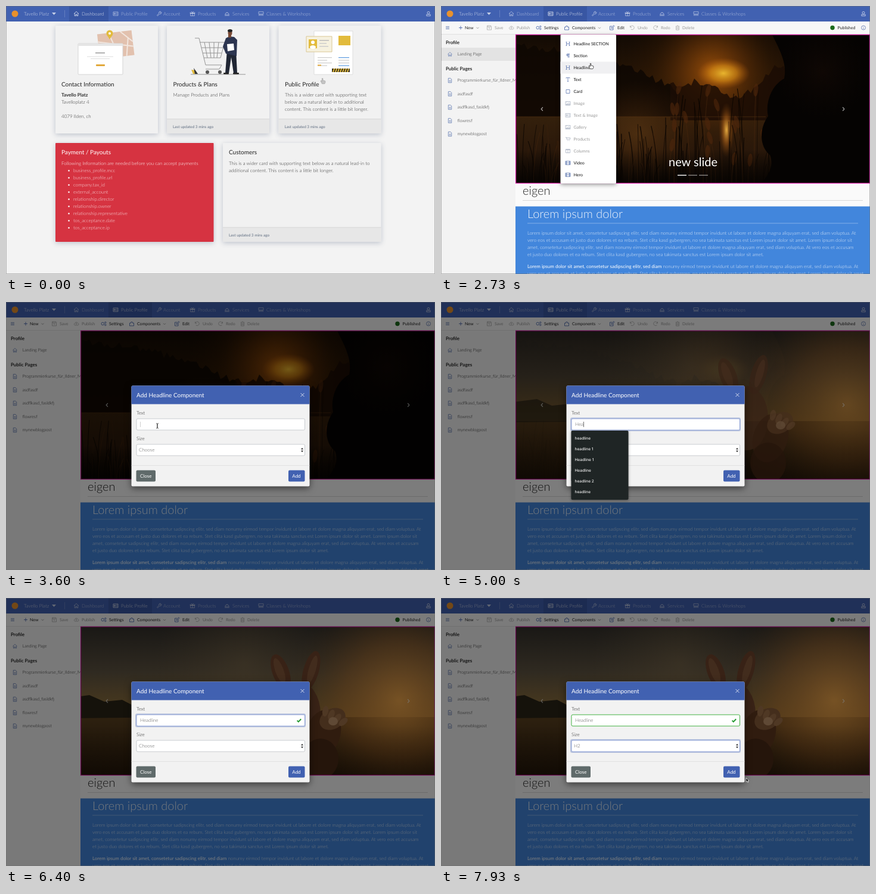
An HTML page with a canvas for the animation above (8 s loop, 720 by 450 pixels).

```html
<!DOCTYPE html>
<html lang="en">
<head>
<meta charset="utf-8">
<title>Page builder</title>
<style>
html, body { margin: 0; width: 100%; height: 100%; overflow: hidden; background: #f3f3f3; }
canvas { display: block; width: 100vw; height: 100vh; }
</style>
</head>
<body>
<canvas id="stage"></canvas>
<script>
const W = 720, H = 450, LOOP = 8000;
const canvas = document.getElementById('stage');
const c = canvas.getContext('2d');
const ratio = window.devicePixelRatio || 1;
canvas.width = W * ratio;
canvas.height = H * ratio;
c.textRendering = 'geometricPrecision';

const BLUE = '#4161b1', INK = '#222', GREY = '#999', SLATE = '#5f78b0';
const OWNER = 'Tavello Platz';

const icons = {
  home: 'M-4 0L0-3.7 4 0M-2.8-.8V3.5H-.8V1H.8V3.5H2.8V-.8',
  id: 'M-4-3H4V3H-4ZM-2.5-1H-.5V1H-2.5ZM1-1H3M1 1H3',
  wrench: 'M-3.6 2.6L-2.6 3.6 .8.4A2.4 2.4 0 0 0 3.8-2.6L2.2-1.2 1.2-2.2 2.6-3.7A2.4 2.4 0 0 0-.4-.6Z',
  gift: 'M-3.4-.5H3.4V3.5H-3.4ZM-4-2H4V-.5H-4ZM0-2V3.5M0-2L-2-3.8M0-2L2-3.8',
  bell: 'M-4 3H4M-3.3 1.8A3.3 3.6 0 0 1 3.3 1.8ZM0-1.9V-3',
  shop: 'M-4-3.3H4V.5H-4ZM-3 2V3.5M0 2V3.5M3 2V3.5M-4 2H4',
  user: 'M-2-1.6A2 2 0 1 1 2-1.6A2 2 0 1 1-2-1.6ZM-3.2 3.7V1.2H3.2V3.7Z',
  menu: 'M-3-2H3M-3 0H3M-3 2H3',
  plus: 'M-3 0H3M0-3V3',
  save: 'M-3.5-3.5H2.5L3.5-2.5V3.5H-3.5ZM-2-3.5V-1H1.5V-3.5M-1.2 1.2H1.2',
  cloud: 'M-2.5 2.5A2 2 0 0 1-2.5-1A3 3 0 0 1 2.8-.8A1.7 1.7 0 0 1 2.5 2.5ZM0 1.5V-1M-1 0L0-1 1 0',
  gear: 'M-4 0A2.3 2.3 0 1 1 .6 0A2.3 2.3 0 1 1-4 0ZM1.6-2A1.2 1.2 0 1 1 4-2A1.2 1.2 0 1 1 1.6-2ZM1.6 2A1.2 1.2 0 1 1 4 2A1.2 1.2 0 1 1 1.6 2Z',
  puzzle: 'M-3.5-1.2H-1.3A1.4 1.4 0 1 1 1.3-1.2H3.5V3.5H-3.5Z',
  edit: 'M2 0V3.5H-3.5V-2.5H0M-1 1L-.8-.6 3-4 4-3 .5.8Z',
  undo: 'M-3.5-3.5V-.8H-.8M-3.3-1A3.3 3.3 0 1 1-2.3 2.3',
  redo: 'M3.5-3.5V-.8H.8M3.3-1A3.3 3.3 0 1 0 2.3 2.3',
  trash: 'M-3-2.5H3M-2.4-2.5V3.6H2.4V-2.5M-1-3.5H1M-.9-.8V2M.9-.8V2',
  file: 'M-2.7-3.7H1L2.7-2V3.7H-2.7ZM-1.3 0H1.3M-1.3 1.7H1.3',
  info: 'M-3.5 0A3.5 3.5 0 1 1 3.5 0A3.5 3.5 0 1 1-3.5 0ZM0-.5V2M0-2V-1.5',
  h: 'M-2.5-3V3M2.5-3V3M-2.5 0H2.5M-3.5-3H-1.5M1.5-3H3.5M-3.5 3H-1.5M1.5 3H3.5',
  para: 'M3-3H-.8A1.6 1.6 0 0 0-.8.2H.3M.3-3V3.2M2-3V3.2M-1-2.2H0M-1.2-1.4H0M-1-.6H0',
  text: 'M-3-2V-3.2H3V-2M0-3.2V3.2M-1.2 3.2H1.2',
  square: 'M-3-3H3V3H-3Z',
  image: 'M-4-3H4V3H-4ZM-3 2L-1 0 0 1 1.5-1 3 1V2ZM-2.5-1.5H-1.5',
  cart: 'M-4-3H-2.6L-1.5 1.2H3L4-2H-2.3M-1 3H-.6M2.4 3H2.8',
  columns: 'M-3.5-3H3.5V3H-3.5ZM0-3V3M-3.5-2.2H3.5',
  film: 'M-4-3H4V3H-4ZM-2.4-3V3M2.4-3V3M-2.4 0H2.4M-4-1H-2.4M-4 1H-2.4M2.4-1H4M2.4 1H4',
  caret: 'M-2-1L0 1 2-1',
  left: 'M1.4-3L-1.4 0 1.4 3',
  right: 'M-1.4-3L1.4 0-1.4 3',
  close: 'M-3-3L3 3M3-3L-3 3',
  check: 'M-3.2 0L-1 2.3 3.4-2.3'
};
for (const k in icons) icons[k] = new Path2D(icons[k]);
const hand = new Path2D('M-1.6 4.6L-4-.2-2.8-.9-1.6.6V-4.5H-.2V-1H1.2L3.8 0V2.6L2.8 4.6Z');
const arrow = new Path2D('M0 0V8.2L1.9 6.4 3.2 9.2 4.5 8.6 3.3 5.9H5.8Z');

const clamp = v => Math.max(0, Math.min(1, v));
const ease = v => { v = clamp(v); return v * v * (3 - 2 * v); };
const prog = (t, a, b) => ease((t - a) / (b - a));

function seeded(s) {
  return () => (s = (s * 16807) % 2147483647) / 2147483647;
}

function box(x, y, w, h, fill, r = 0, line) {
  c.beginPath();
  c.roundRect(x, y, w, h, r);
  if (fill) { c.fillStyle = fill; c.fill(); }
  if (line) { c.strokeStyle = line; c.lineWidth = 1; c.stroke(); }
}

function dot(x, y, r, fill) { oval(x, y, r, r, fill); }

function oval(x, y, rx, ry, fill, rot = 0) {
  c.beginPath();
  c.ellipse(x, y, rx, ry, rot, 0, 7);
  c.fillStyle = fill;
  c.fill();
}

function poly(fill, ...p) {
  c.beginPath();
  for (let i = 0; i < p.length; i += 2) c.lineTo(p[i], p[i + 1]);
  c.closePath();
  c.fillStyle = fill;
  c.fill();
}

// y is the optical middle of the line
function text(s, x, y, size = 8, color = INK, weight = 400, family = 'Lato') {
  c.font = `${weight} ${size}px ${family}, sans-serif`;
  c.fillStyle = color;
  c.fillText(s, x, y + size * .34);
  return c.measureText(s).width;
}

function wrap(s, x, y, width, step, color) {
  c.font = '300 8px Lato, sans-serif';
  let line = '';
  for (const word of s.split(' ')) {
    const next = line ? line + ' ' + word : word;
    if (c.measureText(next).width > width) {
      text(line, x, y, 8, color, 300);
      y += step;
      line = word;
    } else line = next;
  }
  text(line, x, y, 8, color, 300);
}

function icon(name, x, y, color, size = 1, width = .8) {
  c.save();
  c.translate(x, y);
  c.scale(size, size);
  c.strokeStyle = color;
  c.lineWidth = width;
  c.stroke(icons[name]);
  c.restore();
}

function shadow(blur, color, dy = 0) {
  c.shadowBlur = blur * ratio;
  c.shadowColor = color;
  c.shadowOffsetY = dy * ratio;
}

function group(draw) { c.save(); draw(); c.restore(); }

function glow(x, y, r, ...colors) {
  const g = c.createRadialGradient(x, y, 0, x, y, r);
  colors.forEach((k, i) => g.addColorStop(i / (colors.length - 1), k));
  c.fillStyle = g;
  c.fillRect(x - r, y - r, 2 * r, 2 * r);
}

function fade(y0, y1, ...colors) {
  const g = c.createLinearGradient(0, y0, 0, y1);
  colors.forEach((k, i) => g.addColorStop(i / (colors.length - 1), k));
  c.fillStyle = g;
  c.fillRect(100, y0, 660, y1 - y0);
}

const tabs = [
  ['home', 118, 'Dashboard', 127], ['id', 184, 'Public Profile', 193], ['wrench', 257, 'Account', 264],
  ['gift', 313, 'Products', 322], ['bell', 371, 'Services', 380], ['shop', 428, 'Classes & Workshops', 437]
];

function nav(active) {
  box(0, 0, W, 26, BLUE);
  if (active) box(172, 0, 73, 26, '#3856a3');
  else box(106, 0, 66, 26, '#3856a3');
  dot(15, 13, 5.5, '#e8912d');
  text(OWNER, 30, 13, 8, 'rgba(255,255,255,.75)', 300);
  poly('rgba(255,255,255,.7)', 77, 11, 84, 11, 80.5, 15);
  box(98, 7, .6, 12, 'rgba(255,255,255,.3)');
  tabs.forEach(([name, ix, label, x], i) => {
    const color = `rgba(255,255,255,${i === active ? .85 : .58})`;
    icon(name, ix, 13, color);
    text(label, x, 13, 8, color, 300);
  });
  icon('user', 709, 13, 'rgba(255,255,255,.75)');
}

function card(x, y, w, h, fill = '#f1f1f1', footer = true) {
  group(() => { shadow(9, 'rgba(70,85,120,.3)', 2); box(x, y, w, h, fill, 1); });
  if (!footer) return;
  box(x, y + h - 24.5, w, 24.5, '#e7e7e7');
  box(x, y + h - 24.5, w, .7, '#d2d2d2');
  text('Last updated 3 mins ago', x + 10, y + h - 11.5, 6.4, '#5f6d80');
}

function mapArt() {
  group(() => {
    c.translate(184, 63);
    c.rotate(-.12);
    box(-29, -19, 58, 42, '#e2c1ae');
    c.strokeStyle = '#f2e6de';
    c.lineWidth = 2;
    c.stroke(new Path2D('M-29-6L29 8M-10-19L4 23M10-19L29 0M-29 10L0 2M16 23L22-8'));
  });
  dot(174, 46, 5.5, '#e2bb3c');
  poly('#e2bb3c', 169, 48, 179, 48, 174, 56);
  dot(174, 46, 2, '#fff');
  box(121, 63, 75, 52, '#fff', 1, '#d5d5d5');
  box(121, 63, 75, 4, '#e5e5e5');
  box(150, 78, 16, 1.5, '#999');
  box(136, 84.5, 44, 1, '#ddd');
  box(142, 88, 32, 1, '#ddd');
  box(151, 98, 15, 3, '#e2a93c', 1);
}

function cartArt() {
  c.strokeStyle = '#8b8b8b';
  c.lineWidth = .9;
  c.stroke(new Path2D('M317 54H324L335 99H362M325 61H367L360 87H332M335 106H358L362 99M328 70H365M330 79H362M333 61L338 87M341 61L344 87M349 61V87M357 61L354 87'));
  dot(338, 111, 3, '#555');
  dot(359, 111, 3, '#555');
  box(310, 114.5, 92, .7, '#777');
  poly('#e2bb3c', 311, 107, 318, 108, 321, 114, 314, 114);
  poly('#333', 315, 104, 322, 114, 317, 114);
  poly('#202634', 371, 74, 386, 74, 388, 113, 382, 113, 378, 86, 374, 113, 368, 113);
  poly('#2c3550', 369, 54, 375, 51, 383, 52, 388, 57, 387, 84, 369, 80, 364, 68);
  poly('#fff', 371, 64, 382, 63, 383, 74, 372, 76);
  box(373, 46, 5, 7, '#7a4a35');
  oval(376, 45, 3.5, 4.5, '#7a4a35');
  oval(376, 41.5, 4, 2.5, '#222');
  box(365, 112, 9, 2.5, '#222', 1);
  box(381, 112, 10, 2.5, '#222', 1);
}

function pageArt() {
  box(517, 42, 65, 73, '#fff', 0, '#ddd');
  box(558, 50, 20, 16, '#e2bb3c');
  box(504, 51, 43, 26, '#f6f1df', 0, '#d9c795');
  box(508, 56, 14, 15, '#e2bb3c');
  dot(515, 61, 3, '#fff');
  oval(515, 69, 5, 3, '#fff');
  box(526, 57, 16, 1.5, '#bbb');
  box(526, 62, 12, 1.5, '#ccc');
  box(526, 67, 15, 1.5, '#ccc');
  for (let i = 0; i < 4; i++) {
    box(523, 86 + i * 4.5, 24 - (i % 2) * 8, 1.2, '#ccc');
    box(558, 86 + i * 4.5, 18, 1.2, i % 3 ? '#ccc' : '#5b9be0');
  }
  box(523, 98.5, 6, 2, '#e2a93c');
  box(547, 105, 30, 6, '#3b3320');
  for (let x = 548; x < 576; x += 4) poly('#e2bb3c', x, 111, x + 2, 111, x + 4, 105, x + 2, 105);
}

const needed = ['business_profile.mcc', 'business_profile.url', 'company.tax_id', 'external_account',
  'relationship.director', 'relationship.owner', 'relationship.representative', 'tos_acceptance.date', 'tos_acceptance.ip'];
const filler = 'This is a wider card with supporting text below as a natural lead-in to additional content. This content is a little bit longer.';

function dashboard() {
  box(0, 0, W, H, '#f3f3f3');
  nav(0);
  card(83, 33, 172, 181, '#f1f1f1', false);
  card(270, 33, 172, 181);
  card(457.5, 33, 172, 181);
  mapArt();
  cartArt();
  pageArt();
  text('Contact Information', 93, 131.5, 10);
  text(OWNER, 93, 149.5, 8, '#333', 700);
  text('Tavelloplatz 4', 93, 161.5, 8, '#333', 300);
  text('4079 Ilden, ch', 93, 185.5, 8, '#333', 300);
  text('Products & Plans', 280.5, 131.5, 10);
  text('Manage Products and Plans', 280.5, 149.5, 8, '#333', 300);
  text('Public Profile', 468, 131.5, 10);
  wrap(filler, 468, 149.5, 152, 12, '#333');

  card(83, 230, 265.5, 166, '#d63341', false);
  text('Payment / Payouts', 93, 246, 10, '#fff');
  text('Following Information are needed before you can accept payments', 93, 264.5, 8, '#fff', 300);
  needed.forEach((s, i) => {
    dot(105.5, 276.5 + i * 12, 1.3, '#fff');
    text(s, 113, 276 + i * 12, 8, 'rgba(255,255,255,.85)', 300);
  });
  card(364, 230, 265.5, 166);
  text('Customers', 374, 246, 10);
  wrap(filler, 374, 264.5, 245, 12, '#333');
}

function foliage(rnd, x0, x1, top, bottom, fill) {
  c.beginPath();
  c.moveTo(x0, bottom);
  for (let x = x0; x <= x1; x += 5) c.lineTo(x, top((x - x0) / (x1 - x0)) + rnd() * 12);
  c.lineTo(x1, bottom);
  c.fillStyle = fill;
  c.fill();
}

function lake() {
  const rnd = seeded(77);
  fade(48, 186, '#120a04', '#261505', '#331c07');
  fade(186, 298, '#34200c', '#2a180a', '#0b0603');
  glow(455, 110, 150, 'rgba(165,85,10,.9)', 'rgba(110,55,8,.65)', 'rgba(60,30,5,.3)', 'rgba(40,18,4,0)');
  group(() => {
    c.translate(474, 113);
    c.scale(1.7, 1);
    glow(0, 0, 26, '#e8b52e', 'rgba(205,130,20,.75)', 'rgba(170,85,12,0)');
  });
  foliage(rnd, 120, 400, k => 62 + 75 * k * k, 186, 'rgba(14,7,3,.88)');
  foliage(rnd, 385, 590, k => 128 - 35 * Math.sin(k * 9) * k, 192, 'rgba(26,12,4,.82)');
  box(125, 185, 420, 2, 'rgba(70,40,14,.45)');
  glow(330, 215, 90, 'rgba(110,66,22,.45)', 'rgba(90,50,15,0)');
  group(() => {
    c.translate(479, 208);
    c.scale(.28, 1);
    glow(0, 0, 46, 'rgba(245,185,70,.9)', 'rgba(180,100,25,.5)', 'rgba(110,55,10,0)');
  });
  for (let i = 0; i < 130; i++) {
    const x = 128 + rnd() * 430, near = x > 370;
    const h = 30 + rnd() * (near ? 135 : 75), lean = (rnd() - .5) * 22;
    c.beginPath();
    c.moveTo(x, 298);
    c.quadraticCurveTo(x, 298 - h * .6, x + lean, 298 - h);
    c.strokeStyle = i % 3 ? 'rgba(10,5,2,.8)' : 'rgba(70,38,14,.5)';
    c.lineWidth = .6 + rnd();
    c.stroke();
    if (near && i % 3 === 0) oval(x + lean, 298 - h, 4, 11, 'rgba(78,38,12,.6)', lean * .03);
  }
  fade(240, 298, 'rgba(5,3,1,0)', 'rgba(5,3,1,.6)');
  // dark foreground figure
  c.fillStyle = '#050302';
  c.fill(new Path2D('M556 48C566 70 582 95 576 122C556 132 544 160 549 185C534 205 534 236 552 250C560 270 548 285 538 298H720V48Z'));
  glow(640, 110, 80, 'rgba(30,14,7,.4)', 'rgba(20,10,5,0)');
}

function sunsetField() {
  fade(48, 200, '#33302b', '#5f5442', '#a07a3c');
  fade(200, 298, '#5c4220', '#2a1b0b');
  glow(660, 172, 190, 'rgba(255,175,75,.85)', 'rgba(200,125,50,.5)', 'rgba(110,75,35,0)');
  glow(400, 110, 150, 'rgba(150,125,85,.4)', 'rgba(120,100,70,0)');
  poly('#2b2416', 100, 168, 140, 163, 165, 174, 195, 171, 220, 184, 300, 190, 300, 200, 100, 202);
  fade(215, 298, 'rgba(25,14,5,0)', 'rgba(25,14,5,.4)');
  const brown = '#70452c', light = '#85583a';
  oval(461, 124, 14, 31, brown, -.35);
  oval(459, 122, 7, 22, light, -.35);
  oval(512, 122, 13, 34, brown, .28);
  oval(514, 120, 6, 24, light, .28);
  oval(492, 195, 36, 54, brown);
  oval(532, 228, 29, 42, '#60381f', .3);
  oval(548, 203, 23, 17, '#8a5c38', -.5);
  for (let i = 0; i < 4; i++) oval(536 + i * 10, 190 + i * 6, 5, 9, '#a07048', .2 + i * .22);
  oval(549, 207, 8, 7, '#c0946a');
  oval(528, 270, 30, 34, '#4a2a16');
}

const lorem = 'Lorem ipsum dolor sit amet, consetetur sadipscing elitr, sed diam nonumy eirmod tempor invidunt ut labore et dolore magna aliquyam erat, sed diam voluptua. At vero eos et accusam et justo duo dolores et ea rebum. Stet clita kasd gubergren, no sea takimata sanctus est Lorem ipsum dolor sit amet.';

const tools = [
  ['plus', 33, 'New', 40, 1], ['save', 81, 'Save', 90, 0], ['cloud', 118, 'Publish', 127, 0],
  ['gear', 164, 'Settings', 173, 1], ['puzzle', 211, 'Components', 220, 1], ['edit', 287, 'Edit', 296, 1],
  ['undo', 321, 'Undo', 330, 0], ['redo', 360, 'Redo', 369, 0], ['trash', 397, 'Delete', 405, 0]
];
const pages = ['Programmierkurse_für_Ildner_M', 'asdfasdf', 'asdflkasd_fasldkfj', 'flowresf', 'mynewblogpost'];

function builder(t) {
  box(0, 0, W, H, '#f3f3f3');
  nav(1);
  box(0, 26, W, 22, '#f7f7f7');
  box(0, 47, W, .7, '#d8d8d8');
  icon('menu', 11, 36.5, SLATE);
  tools.forEach(([name, ix, label, x, on]) => {
    icon(name, ix, 36.5, on ? '#3f5fa8' : '#aaa');
    text(label, x, 36.5, 7, on ? INK : GREY);
  });
  icon('caret', 61.5, 36.8, '#888');
  icon('caret', 266, 36.8, '#888');
  dot(657, 36.5, 3.7, '#1c6b1c');
  text('Published', 665.5, 36.5, 7);
  icon('info', 709, 36.5, SLATE);

  if (t < 2930) box(0, 70, 125, 22, '#e3e3e3');
  text('Profile', 8, 61, 8, '#111', 600);
  icon('home', 15, 81, SLATE, .9);
  text('Landing Page', 27.5, 81, 7.2, INK, 300);
  text('Public Pages', 8, 105, 8, '#111', 600);
  group(() => {
    c.beginPath();
    c.rect(0, 48, 125, 402);
    c.clip();
    pages.forEach((s, i) => {
      icon('file', 15, 125 + i * 22.5, SLATE);
      text(s, 27.5, 125 + i * 22.5, 7.2, INK, 300);
    });
  });

  box(125, 298, 595, 39, '#fafafa');
  text('eigen', 137, 310.5, 20, INK, 300);
  box(137, 326, 571, .8, '#ccc');
  box(125, 336.5, 595, 114, '#4286dc');
  text('Lorem ipsum dolor', 145, 349, 20, 'rgba(255,255,255,.9)', 300);
  box(145, 364.5, 555, .8, 'rgba(255,255,255,.45)');
  const pale = 'rgba(255,255,255,.85)';
  wrap(lorem + ' ' + lorem, 145, 381, 553, 12.2, pale);
  const w = text('Lorem ipsum dolor sit amet, consetetur sadipscing elitr, sed diam', 145, 437, 8, '#fff');
  text(' nonumy eirmod tempor invidunt ut labore et dolore magna aliquyam erat, sed diam voluptua. At', 145 + w, 437, 8, pale, 300);
  text('vero eos et accusam et justo duo dolores et ea rebum. Stet clita kasd gubergren, no sea takimata sanctus est Lorem ipsum dolor sit amet. Lorem ipsum dolor sit amet,', 145, 449.3, 8, pale, 300);

  group(() => {
    c.beginPath();
    c.rect(125, 48, 595, 250);
    c.clip();
    const swap = prog(t, 4730, 5130);
    if (swap < 1) lake();
    if (swap > 0) {
      c.globalAlpha = swap;
      c.translate(22 * (1 - prog(t, 4950, 5350)), 0);
      sunsetField();
    }
  });
  icon('left', 169.5, 173, 'rgba(255,255,255,.65)', 1, 1.1);
  icon('right', 675.5, 173, 'rgba(255,255,255,.65)', 1, 1.1);
  text('new slide', 382, 262.5, 20, '#fff');
  for (let i = 0; i < 3; i++) box(397 + i * 18, 283.5, 15, 1.4, i ? 'rgba(255,255,255,.5)' : '#fff');
  c.strokeStyle = '#d30fa0';
  c.lineWidth = 1.2;
  c.strokeRect(125.6, 48.3, 593.8, 249.2);
}

const parts = [
  ['h', 'Headline SECTION', 1], ['para', 'Section', 1], ['h', 'Headline', 1], ['text', 'Text', 1], ['square', 'Card', 1],
  ['image', 'Image', 0], ['id', 'Text & Image', 0], ['image', 'Gallery', 0], ['cart', 'Products', 0], ['columns', 'Columns', 0],
  ['film', 'Video', 1], ['film', 'Hero', 1]
];

function partsMenu(my) {
  group(() => { shadow(7, 'rgba(0,0,0,.4)', 2); box(200.5, 48, 93.5, 250, '#fff', 1.5); });
  const over = Math.floor((my - 53.5) / 20);
  parts.forEach(([name, label, on], i) => {
    const y = 63.5 + i * 20;
    if (i === over) box(200.5, y - 10, 93.5, 20, '#f0f0f2');
    icon(name, 213, y, on ? SLATE : '#a9b1c2');
    text(label, 222.5, y, 7.1, on ? '#111' : GREY);
  });
}

function field(y, border, focus) {
  if (focus > 0) box(217, y - 2, 286, 23, `rgba(65,97,177,${.32 * focus})`, 3);
  box(219, y, 282.5, 19, '#fff', 2, focus > .5 ? '#8ea2d6' : border);
}

const keys = [4270, 4600, 4800, 5100, 5200, 5330, 5430, 5530];
const hints = ['headline', 'headline 1', 'Headline 1', 'Headline', 'headline 2', 'headline'];
const sizes = ['Choose', 'H1', 'H2', 'H3'];

function modal(t, my) {
  c.globalAlpha = clamp((t - 2930) / 200);
  c.fillStyle = 'rgba(0,0,0,.5)';
  c.fillRect(0, 0, W, H);
  const open = prog(t, 2970, 3270);
  c.globalAlpha = open;
  c.translate(0, -25 * (1 - open));
  group(() => { shadow(12, 'rgba(0,0,0,.55)', 3); box(210.5, 140.5, 299, 169, '#f2f2f2', 2); });
  box(210.5, 140.5, 299, 31, BLUE, [2, 2, 0, 0]);
  text('Add Headline Component', 219, 156.3, 10, '#fff');
  icon('close', 497.5, 156, 'rgba(255,255,255,.75)', 1, 1);
  text('Text', 219, 186, 8, INK, 300);
  text('Size', 219, 229, 8, INK, 300);

  const valid = t >= 6130;
  field(196, valid ? '#43b043' : '#c9ccd0', prog(t, 3900, 4000) - prog(t, 6800, 6930));
  const typed = 'Headline'.slice(0, keys.filter(k => t >= k).length);
  const w = text(typed, 225, 205.7, 8, '#555', 300);
  if (t < 6130 && (t < 3930 || t > 4600 || t % 1000 < 500)) box(225.2 + w, 201, .7, 9, t < 3930 ? '#bbb' : '#333');
  if (valid) icon('check', 491.8, 205.6, '#259b32', 1, 2);

  field(239, '#c9ccd0', prog(t, 6800, 6930));
  text(t < 7670 ? 'Choose' : 'H2', 223, 248.5, 8, '#555', 300);
  poly('#333', 495, 247.5, 499, 247.5, 497, 244.7);
  poly('#333', 495, 249.5, 499, 249.5, 497, 252.3);

  box(210.5, 274, 299, .8, '#dcdcdc');
  box(218.5, 282.5, 32.5, 19, '#5f6a6a', 2);
  text('Close', 225, 292, 8, '#fff');
  box(474, 282.5, 27.5, 19, BLUE, 2);
  text('Add', 480.3, 292, 8, '#fff');

  if (t >= 4530 && t < 6130) {
    group(() => { shadow(4, 'rgba(0,0,0,.4)', 1); box(218.5, 216, 96, 116, '#1f2525', 2); });
    hints.forEach((s, i) => text(s, 224.5, 228.5 + i * 18, 6.5, '#eee', 500, 'Inter'));
  }
  if (t >= 6930 && t < 7670) {
    group(() => { shadow(5, 'rgba(0,0,0,.45)', 1); box(211, 239, 290, 70, '#262b2b', 3); });
    const over = Math.floor((my - 240) / 17);
    sizes.forEach((s, i) => {
      const y = 248.5 + i * 17;
      if (i === over) box(211, y - 8, 290, 16.5, '#3b6fd8');
      if (!i) icon('check', 217, y, '#eee', .7, 1.2);
      text(s, 223, y, 7, '#eee', 400, 'Inter');
    });
  }
}

// time, x, y
const path = [
  [0, 532, 126], [69, 532, 126], [70, 203, 62], [600, 203, 62], [730, 206, 16], [930, 206, 16], [1270, 111, 95],
  [1400, 124, 166], [1470, 127, 168], [2200, 246, 38], [2470, 246, 40], [2730, 252, 101], [2900, 252, 102],
  [3330, 252, 150], [3600, 254, 208], [4270, 254, 208], [6800, 300, 226], [7000, 300, 249], [7400, 290, 283],
  [7670, 290, 283], [7930, 512, 302], [8001, 512, 302]
];

function pointer(t) {
  const i = path.findIndex(p => p[0] > t), a = path[i - 1], b = path[i];
  const k = prog(t, a[0], b[0]);
  return [a[1] + (b[1] - a[1]) * k, a[2] + (b[2] - a[2]) * k];
}

function cursor(t, x, y) {
  if (t >= 4200 && t < 6800) return;
  c.translate(x, y);
  c.lineWidth = .8;
  if (t >= 3450 && t < 4200) {
    c.strokeStyle = '#222';
    c.stroke(new Path2D('M-2-4.2Q0-4 0-3V3Q0 4-2 4.2M2-4.2Q0-4 0-3V3Q0 4 2 4.2'));
  } else if (t >= 2930 || (t >= 70 && t < 600)) {
    c.fillStyle = '#111';
    c.strokeStyle = '#fff';
    c.scale(.85, .85);
    c.fill(arrow);
    c.stroke(arrow);
  } else {
    c.fillStyle = t < 70 ? '#c4c4c4' : '#fff';
    c.strokeStyle = t < 70 ? '#aaa' : '#333';
    c.fill(hand);
    c.stroke(hand);
  }
}

function draw(t) {
  c.setTransform(ratio, 0, 0, ratio, 0, 0);
  const [x, y] = pointer(t);
  if (t < 800) dashboard();
  else builder(t);
  if (t >= 2330 && t < 2930) partsMenu(y);
  if (t >= 2930) group(() => modal(t, y));
  group(() => cursor(t, x, y));
  c.strokeStyle = 'rgba(110,110,110,.45)';
  c.lineWidth = 1;
  c.strokeRect(.5, .5, W - 1, H - 1);
}

function tick() {
  draw(performance.now() % LOOP);
  requestAnimationFrame(tick);
}
tick();
</script>
</body>
</html>
```
